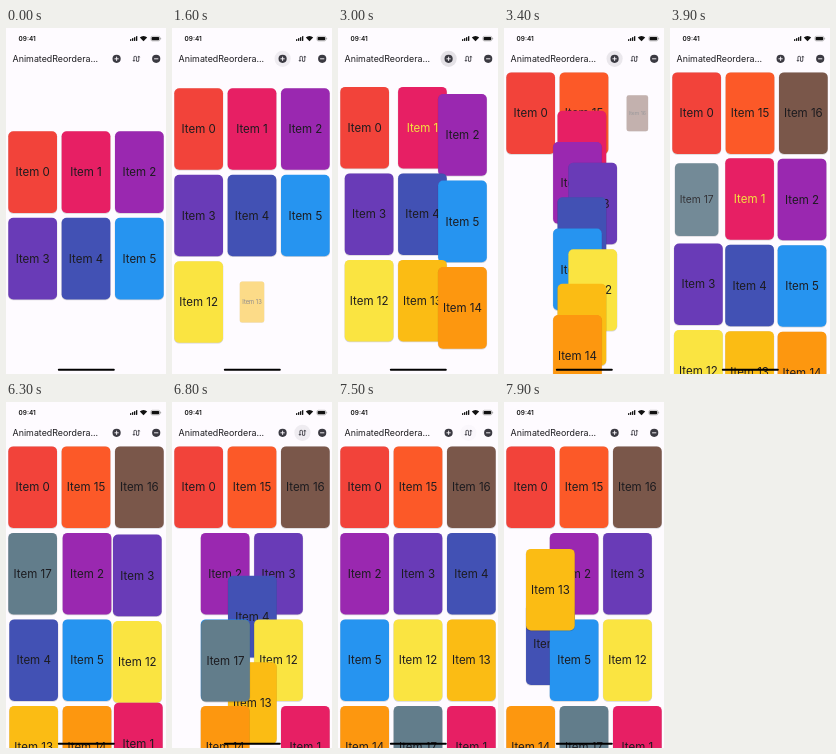
Write an HTML page that moves like this. It is 160 px wide and 346 px high and loops after 8 s.

```html
<!DOCTYPE html>
<html>
<head>
<meta charset="utf-8">
<style>
  html, body { margin: 0; width: 100%; height: 100%; overflow: hidden; background: #fefbff; }
  svg { display: block; width: 160px; height: 346px; font-family: Inter, sans-serif; }
</style>
</head>
<body>
<svg viewBox="0 0 160 346" xmlns="http://www.w3.org/2000/svg">
  <rect width="160" height="346" fill="#fefbff"/>
  <g id="grid"></g>

  <text x="12.6" y="12.9" font-size="6.4" font-weight="600" fill="#111">09:41</text>
  <g fill="#111">
    <rect x="124" y="11" width="1.3" height="2" rx=".4"/>
    <rect x="126" y="10" width="1.3" height="3" rx=".4"/>
    <rect x="128" y="9" width="1.3" height="4" rx=".4"/>
    <rect x="130" y="8" width="1.3" height="5" rx=".4"/>
    <path d="M137.5 13.2L133.8 9.5A5.2 5.2 0 0 1 141.2 9.5Z"/>
    <rect x="144.9" y="8.3" width="9" height="4.6" rx="1.4" fill="none" stroke="#888" stroke-width=".5"/>
    <rect x="145.6" y="9" width="7.6" height="3.2" rx=".8"/>
    <rect x="154.4" y="9.8" width=".7" height="1.6" rx=".3" fill="#888"/>
  </g>

  <text x="6.6" y="34.1" font-size="8.9" fill="#1c1b1f">AnimatedReordera...</text>
  <circle id="addGlow" cx="110.6" cy="30.8" r="8.1" fill="#46464f" opacity="0"/>
  <circle id="moveGlow" cx="130.4" cy="30.8" r="8.1" fill="#46464f" opacity="0"/>
  <g fill="#3b3a42">
    <circle cx="110.6" cy="30.8" r="4.1"/>
    <circle cx="150.2" cy="30.8" r="4.1"/>
    <path transform="translate(125.5 26.1) scale(.407)" d="M18 4l-4 4h3v7c0 1.1-.9 2-2 2s-2-.9-2-2V8c0-2.2-1.8-4-4-4S5 5.800 5 8v7H2l4 4 4-4H7V8c0-1.100.9-2 2-2s2 .9 2 2v7c0 2.200 1.800 4 4 4s4-1.800 4-4V8h3z"/>
  </g>
  <path d="M108.500 30.800h4.200M110.600 28.700v4.200M148.100 30.800h4.200" stroke="#fefbff" stroke-width=".9"/>
  <rect x="51.800" y="340.700" width="57" height="2.100" rx="1" fill="#000"/>
</svg>
<script>
const LOOP = 8000, MOVE = 500, LEAD = 60;
const W = 48.7, H = 81.6, DX = 53.35, DY = 86.5, LEFT = 2.3;

const colors = {
  0: '#f2433a', 1: '#e71f64', 2: '#9a28b0', 3: '#693bb7', 4: '#4251b4', 5: '#2694f0',
  12: '#fae441', 13: '#fbbc14', 14: '#fd970f', 15: '#fc5928', 16: '#7a574a', 17: '#627d8b'
};

// Each step puts an item at an index; a new item grows in, a known one moves.
const steps = [
  { t: 1070, id: 12, to: 6 }, { t: 1350, id: 13, to: 7 }, { t: 1650, id: 14, to: 8 },
  { t: 2900, id: 15, to: 1 }, { t: 3180, id: 16, to: 2 }, { t: 3455, id: 17, to: 3 },
  { t: 5850, id: 1, to: 11 }, { t: 6550, id: 17, to: 10 }, { t: 7550, id: 13, to: 3 }
];

const $ = id => document.getElementById(id);
const clamp = v => Math.max(0, Math.min(1, v));
const mix = (a, b, k) => a + (b - a) * k;

function make(tag, attrs, parent) {
  const el = document.createElementNS('http://www.w3.org/2000/svg', tag);
  for (const k in attrs) el.setAttribute(k, attrs[k]);
  parent.appendChild(el);
  return el;
}

// cubic-bezier(.42, 0, .58, 1)
function ease(x) {
  if (x <= 0 || x >= 1) return clamp(x);
  let lo = 0, hi = 1, s = .5;
  for (let i = 0; i < 24; i++) {
    s = (lo + hi) / 2;
    const bx = 3 * (1 - s) ** 2 * s * .42 + 3 * (1 - s) * s * s * .58 + s ** 3;
    if (bx < x) lo = s; else hi = s;
  }
  return s * s * (3 - 2 * s);
}

function slot(i, count) {
  const rows = Math.ceil(count / 3);
  const top = rows < 3 ? 103.3 : rows < 4 ? 60.2 : 44.4;
  return { x: LEFT + DX * (i % 3), y: top + DY * Math.floor(i / 3) };
}

function place(m, t) {
  const k = ease((t - m.start) / MOVE);
  return { x: mix(m.from.x, m.to.x, k), y: mix(m.from.y, m.to.y, k) };
}

function layout(t) {
  const order = [0, 1, 2, 3, 4, 5], items = {};
  let lifted = null;
  order.forEach((id, i) => {
    const p = slot(i, 6);
    items[id] = { from: p, to: p, start: -MOVE, born: -MOVE };
  });
  for (const s of steps) {
    if (s.t > t) break;
    const old = order.indexOf(s.id);
    if (old >= 0) {
      order.splice(old, 1);
      lifted = t < s.t + MOVE ? s.id : null;
    }
    order.splice(s.to, 0, s.id);
    order.forEach((id, i) => {
      const to = slot(i, order.length), m = items[id];
      if (!m) items[id] = { from: to, to, start: s.t, born: s.t };
      else if (m.to.x !== to.x || m.to.y !== to.y)
        items[id] = { from: place(m, s.t), to, start: s.t, born: m.born };
    });
  }
  const stack = order.filter(id => id !== lifted);
  if (lifted !== null) stack.push(lifted);
  return { stack, items };
}

const grid = $('grid'), tiles = {};
for (const id in colors) {
  const g = make('g', {}, grid);
  make('rect', { x: -W / 2 - .3, y: -H / 2 + .2, width: W + .6, height: H + .6, rx: 5.2, fill: '#000', opacity: .16 }, g);
  make('rect', { x: -W / 2, y: -H / 2, width: W, height: H, rx: 5, fill: colors[id] }, g);
  const label = make('text', { y: 4.2, 'font-size': 11.5, 'text-anchor': 'middle', fill: '#1c1b1f' }, g);
  label.textContent = 'Item ' + id;
  tiles[id] = { g, label };
}

function glow(t, isAdd) {
  let a = 0;
  steps.forEach((s, i) => {
    const d = t - s.t + LEAD;
    if ((i < 6) === isAdd && d > 0) a = Math.max(a, Math.min(clamp(d / 80), clamp((400 - d) / 150)));
  });
  return a * .14;
}

let shown = '';
function draw(t) {
  const { stack, items } = layout(t);
  const key = stack.join();
  if (key !== shown) {
    for (const id in tiles) tiles[id].g.style.display = items[id] ? '' : 'none';
    stack.forEach(id => grid.appendChild(tiles[id].g));
    shown = key;
  }
  for (const id of stack) {
    const p = place(items[id], t), grow = clamp((t - items[id].born) / MOVE);
    tiles[id].g.setAttribute('transform', `translate(${p.x + W / 2} ${p.y + H / 2}) scale(${grow})`);
    tiles[id].g.setAttribute('opacity', grow);
  }
  tiles[1].label.setAttribute('fill', t >= 2400 && t < 5300 ? '#f3e63f' : '#1c1b1f');
  $('addGlow').setAttribute('opacity', glow(t, true));
  $('moveGlow').setAttribute('opacity', glow(t, false));
}

const begin = performance.now();
function tick() {
  draw((performance.now() - begin) % LOOP);
  requestAnimationFrame(tick);
}
draw(0);
requestAnimationFrame(tick);
</script>
</body>
</html>
```
